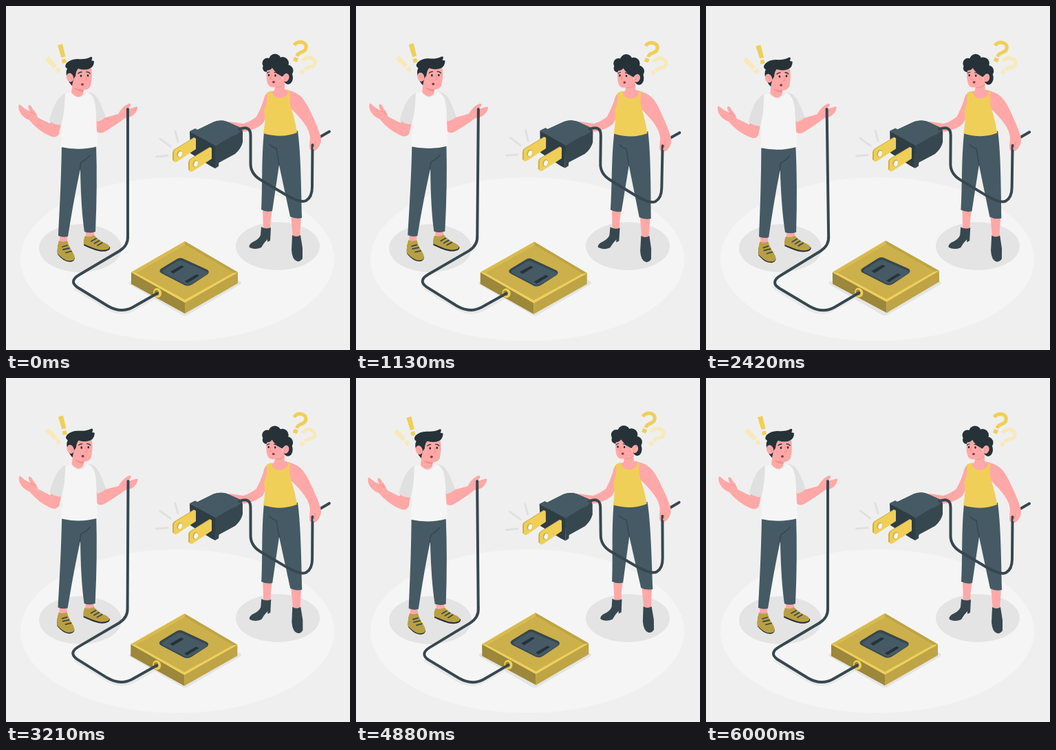
An HTML page with a canvas for the animation above (6.04 s loop, 500 by 500 pixels).

```html
<!DOCTYPE html>
<html lang="en">
<head>
<meta charset="utf-8">
<title>Unplugged</title>
<style>
html, body { margin: 0; width: 100%; height: 100%; overflow: hidden; background: #efefef; }
canvas { display: block; width: 100vw; height: 100vh; }
</style>
</head>
<body>
<canvas id="stage"></canvas>
<script>
const canvas = document.getElementById('stage');
const ctx = canvas.getContext('2d');
const LOOP = 6040, FPS = 24;

const INK = '#263238', DARK = '#37474f', SLATE = '#455a64';
const SKIN = '#ffa8a7', BLUSH = '#f28f8f';
const YELLOW = '#f0cf58', GOLD = '#ccb04b', OLIVE = '#9c873a', PALE = '#f8e9b9';
const GREY = '#e0e0e0', SHADOW = '#e4e4e4', WHITE = '#f5f5f5';

const paths = new Map();
function shape(d) {
  if (!paths.has(d)) paths.set(d, new Path2D(d));
  return paths.get(d);
}
function fill(color, d) {
  ctx.fillStyle = color;
  ctx.fill(shape(d));
}
function line(color, width, d, cap = 'round') {
  ctx.strokeStyle = color;
  ctx.lineWidth = width;
  ctx.lineCap = cap;
  ctx.lineJoin = 'round';
  ctx.stroke(shape(d));
}
function oval(color, x, y, rx, ry = rx, turn = 0) {
  ctx.fillStyle = color;
  ctx.beginPath();
  ctx.ellipse(x, y, rx, ry, turn, 0, Math.PI * 2);
  ctx.fill();
}

// Swings 0 -> 1 -> -1 -> 0 degrees at constant speed
function sway(sec, period) {
  const p = (sec / period) % 1;
  const deg = p < 0.25 ? p * 4 : p < 0.75 ? 2 - p * 4 : p * 4 - 4;
  return deg * Math.PI / 180;
}
function turned(x, y, angle, draw) {
  ctx.save();
  ctx.translate(x, y);
  ctx.rotate(angle);
  ctx.translate(-x, -y);
  draw();
  ctx.restore();
}

function ground() {
  ctx.fillStyle = '#efefef';
  ctx.fillRect(0, 0, 500, 500);
  oval('#f5f5f5', 249, 368, 228, 119);
  oval(SHADOW, 108, 352, 60, 35);
  oval(SHADOW, 395, 349, 61, 35);
  line('#e8e8e8', 4, 'M101 411L148 440Q167 450 184 442L214 425');
  fill(SHADOW, 'M180 401L260 356L340 400Q344 402 340 405L264 449Q260 451 256 449L180 405Q177 403 180 401Z');
}

function box() {
  fill(OLIVE, 'M182 387L260 431V447L182 404Z');
  fill('#bfa446', 'M337 387L260 431V447L337 403Z');
  fill(YELLOW, 'M260 342L337 387L260 431L182 387Z');
  fill('#bfa446', 'M260 342L337 387L330 388L260 347Z');
  fill('#d8bb50', 'M260 342L182 387L189 388L260 347Z');
  fill(GOLD, 'M260 347L330 388L260 427L189 388Z');
  fill(DARK, 'M225 382L248 368Q252 365 257 367L292 383Q297 386 293 390L270 405Q265 408 260 406L227 389Q221 386 225 382Z');
  fill(SLATE, 'M228 384L249 371Q253 369 257 371L291 386Q295 388 291 391L269 404Q265 406 260 404L229 388Q226 386 228 384Z');
  fill(INK, 'M239 386L255 377L259 379L243 389Z');
  fill(INK, 'M260 400L277 390L281 392L264 402.5Z');
  oval(YELLOW, 220, 417, 6, 7, -0.3);
  oval(OLIVE, 219, 417, 3.2, 4.2, -0.3);
}

function man() {
  // Exclamation marks
  fill(YELLOW, 'M75 57L82 55L86.5 73.5L80.5 75Z');
  fill(YELLOW, 'M81 78L86.5 76.5L88 82L82 83.5Z');
  fill(PALE, 'M56 78L61.5 73L74 86.5L69.5 91Z');
  fill(PALE, 'M71 93L76 89L80 94L75.5 98Z');

  // Arms
  fill(SKIN, 'M80 171L77 186Q73 193 64 189Q46 181 34 166Q24 162 20 154Q17 147 19 143C23 144 24 148 31 151L35 153Q31 147 33 144Q36 143 39 150Q43 153 46 162L64 171L66 165Z');
  fill(SKIN, 'M130 163L145 162L163 157Q168 147 178 142Q182 141 181 145L177 150L187 147Q192 145 191 149Q189 157 181 161Q174 161 166 168Q150 179 141 184Q134 186 131 181Z');
  line(BLUSH, 1, 'M36 154Q40 155 42 158');

  // Shoes
  fill(SKIN, 'M78 332H89V345H78Z');
  fill(SKIN, 'M116 326H128V338H116Z');
  fill(INK, 'M76 346Q74 355 75 361C81 368 86 372 94 372Q100 371 100 366L88 356Z');
  fill('#b99f44', 'M77 341Q83 344 89 341Q92 351 97 358Q103 368 96 370C88 372 82 367 75 360Q74 351 77 341Z');
  line(DARK, 1.8, 'M82 350L89 348M83 354L92 352M87 358.5L95 356.5');
  fill(INK, 'M114 341L113 348C126 354 139 360 149 355Q152 353 151 350Z');
  fill('#b99f44', 'M115 334Q121 337 128 333Q135 341 145 345Q153 349 149 353C138 358 126 351 113 346Q112 340 115 334Z');
  line(DARK, 1.8, 'M124 342L131 338M128.5 345L135.5 341M133 348L140 344');

  // Trousers
  fill(SLATE, 'M81 202H131Q133 260 130 328Q122 331 114 328Q109 296 108 237Q99 278 90 335Q83 337 76 334C78 292 80 260 81 202Z');
  line(DARK, 1.5, 'M107 238L109 227Q116 224 122 217');

  // Shirt
  fill(GREY, 'M86 127C73 133 67 151 63 167Q70 173 80 173L87 144Z');
  fill(GREY, 'M116 125C132 124 136 138 145 161Q140 167 132 168L126 140Z');
  fill(WHITE, 'M86 128L97 125Q106 137 115 125C128 125 131 143 131 160L133 204Q107 211 80 205L81 172C85 155 85 143 86 128Z');
  line(GREY, 1, 'M96 127Q106 139 116 126');

  // Head
  fill(SKIN, 'M97 108L114 114L112 128Q105 137 95 126Z');
  fill(BLUSH, 'M99 119Q106 122 113 121L112 125Q103 124 99 119Z');
  fill(SKIN, 'M97 91H124C126 102 124 110 123 116Q120 122 113 122Q102 121 98 111Z');
  fill(INK, 'M89 104Q86 97 89 91Q84 88 88 83Q94 77 104 77Q116 78 123 74L125 74Q126 77 124 79L128 80Q128 88 122 91Q114 94 105 91Q102 93 101 102L98 106L96 116Q91 111 89 104Z');
  oval(SKIN, 93, 104, 5, 6.5, -0.3);
  line(BLUSH, 0.9, 'M91 102Q95 102 95 107');
  oval(INK, 109, 101.5, 1.4, 1.8);
  oval(INK, 119, 101, 1.4, 1.8);
  line(INK, 1.3, 'M105 98Q107 96 110 96M117 96Q120 95.5 122 98');
  line(BLUSH, 1.1, 'M115 101L117 107L114 108');
  oval('#8e3c45', 111, 114, 2.1, 1.8);

  box();
  line(DARK, 4, 'M177 150V334Q178 348 165 356L106 391Q91 400 104 409L148 436Q167 447 184 438L220 417.5');
}

function prong(dx, dy) {
  ctx.save();
  ctx.translate(dx, dy);
  fill(GOLD, 'M242 213Q242 210 245 208L273 191L276 193L246 211V227L242 224Z');
  fill(YELLOW, 'M244 212.5Q244 210 247 208L274 191.5L276 193V208L249 226Q244 228.5 244 224Z');
  oval(GOLD, 252.5, 215, 4, 5.4, 0.35);
  oval(WHITE, 253.2, 215.4, 2.8, 4.3, 0.35);
  ctx.restore();
}

function plug() {
  fill(DARK, 'M276 181L302 168.5Q311 165 321 168L339 176Q345 179 344 188V198Q342 207 333 215L309 228L300 206Z');
  fill(SLATE, 'M276 181L302 168.5Q311 165 321 168L339 176Q343 178 342 181Q337 187 327 190L310 200Z');
  fill(SLATE, 'M267 182L275 178L312 199L304 204Z');
  fill(DARK, 'M304 204L312 199L309 233L304 236Z');
  fill('#2f3d45', 'M267 182L304 203V236L298 233L268 214Z');
  prong(0, 0);
  prong(23, 14);
}

function woman() {
  // Question marks
  line(YELLOW, 5.2, 'M419 57C424 49 438 52 436 61C435 69 425 65 423 73', 'butt');
  fill(YELLOW, 'M419 74L425 76L423 81.5L417 79.5Z');
  line(PALE, 5.2, 'M431 80C435 72 450 74 449 83C448 91 439 86 434.5 92.5', 'butt');
  fill(PALE, 'M430 92L435 95.5L431.5 100L426.5 96.5Z');
  line(GREY, 3, 'M224 193L239 204M246 182L250 197M218.5 219L235 217.5');

  // Far arm
  fill(SKIN, 'M384 124Q376 126 374 138Q370 150 364 161Q355 168 345 171L324 168Q320 171 327 174L333 180Q341 184 350 182Q366 178 373 171L381 156Z');
  plug();

  // Legs
  fill(SKIN, 'M373 294H387Q384 310 384 326H374Z');
  fill(SKIN, 'M414 304H429L427 338H417Z');
  fill(DARK, 'M371 321Q377 325 385 322L384 341L380 343V339Q375 344 371 351Q362 355 354 351Q352 348 357 344Q368 339 370 333Z');
  fill(DARK, 'M416 333Q422 337 428 333L431 352V367Q428 372 423 371Q416 369 415 355Z');
  fill(SLATE, 'M375 183Q399 192 424 181C428 211 429 250 430 308Q421 310 413 306Q404 264 397 231Q392 264 387 298Q379 300 371 296C373 260 371 224 375 183Z');
  line(DARK, 1.5, 'M397 231L393 207Q388 206 383 201');

  // Near arm and top
  fill(SKIN, 'M379 126L390 123L392 112L405 109V121Q418 124 424 128C434 134 440 148 446 161C452 174 458 187 457 195Q455 208 449 210Q441 212 441 204L442 191C441 178 431 165 413 148Z');
  fill(YELLOW, 'M379 126L386 123Q388 134 398 134Q409 134 411 122L413 125Q411 140 415 150Q421 169 423 184Q401 193 374 185Q378 165 375 152Q381 140 379 126Z');
  line(BLUSH, 1, 'M392 118Q399 119 404 114');

  // Head
  oval(INK, 380, 83, 7.5);
  oval(INK, 391, 78.5, 9);
  oval(INK, 402, 83, 9);
  oval(INK, 409, 94, 8.5);
  oval(INK, 410, 104, 7, 10);
  oval(INK, 379, 90, 6);
  fill(SKIN, 'M380 91Q391 89 396 95L401 103L404 111Q399 118 390 118Q382 119 380 112Q377 102 380 91Z');
  fill(INK, 'M376 93Q383 95 387 90Q392 98 402 103L408 92L395 80L381 83Z');
  oval(SKIN, 407, 104, 4.5, 6, 0.25);
  line(BLUSH, 0.9, 'M409 101Q405 102 405 107');
  oval(INK, 382, 100.5, 1.3, 1.7);
  oval(INK, 391.5, 101, 1.3, 1.7);
  line(INK, 1.2, 'M379.5 97.5Q381 96 383 96M390 96.5Q393 96 395 98.5');
  line(BLUSH, 1.1, 'M386 100L384 106L387 107');
  oval('#8e3c45', 389, 110.5, 2, 1.7);

  // Cord
  line(DARK, 4, 'M339 179Q355.5 173 355.5 188V228Q355 243 369 252L406 274Q428 287 436 283Q445 278 445 263L445.5 202M457 190L470 182.5');
  fill(SKIN, 'M448 191L457 187Q460 199 453 207Q448 211 446 207L450 197Z');
  line(BLUSH, 0.9, 'M450 197L448 205');
}

function render(ms) {
  const sec = Math.floor((ms % LOOP + 5) * FPS / 1000) / FPS;
  const ratio = window.devicePixelRatio || 1;
  const w = Math.round(innerWidth * ratio), h = Math.round(innerHeight * ratio);
  if (canvas.width !== w || canvas.height !== h) {
    canvas.width = w;
    canvas.height = h;
  }
  ctx.setTransform(w / 500, 0, 0, h / 500, 0, 0);
  ground();
  turned(180, 251, sway(sec, 3), man);
  turned(345, 211, sway(sec, 6), woman);
}

const start = performance.now();
function tick() {
  render(performance.now() - start);
  requestAnimationFrame(tick);
}
tick();
</script>
</body>
</html>
```
